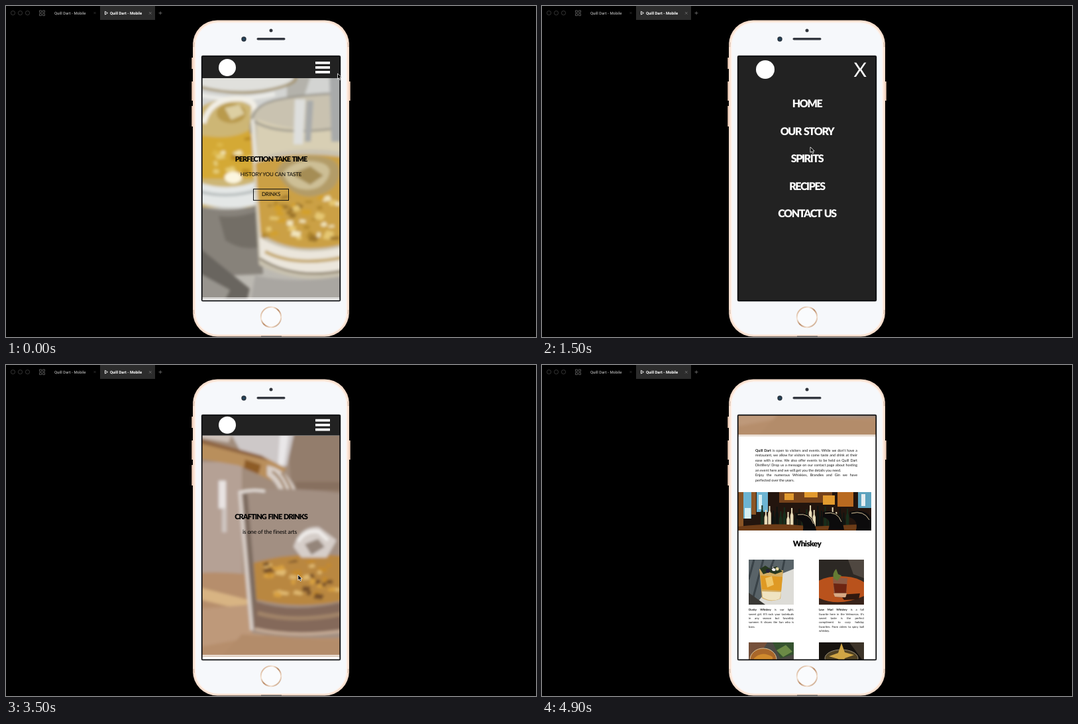
An HTML page for the animation above (5 s loop, 800x500 px).

```html
<!DOCTYPE html>
<html lang="en">
<head>
<meta charset="utf-8">
<title>Mobile prototype</title>
<style>
html, body { margin: 0; width: 100%; height: 100%; overflow: hidden; background: #000; }
body { text-rendering: geometricPrecision; font-family: Lato, "Open Sans", sans-serif; }
#stage { position: relative; width: 800px; height: 500px; overflow: hidden; background: #000; }
#stage > svg { position: absolute; left: 0; top: 0; }
#screen { position: absolute; left: 296px; top: 76px; width: 208px; height: 369px; overflow: hidden;
  background: #fff; box-shadow: 0 0 0 1.2px #0b0c0f; border-radius: 1px; }
#screen::after { content: ""; position: absolute; inset: 0; box-shadow: inset 0 0 0 .6px #0b0c0f; }
.page { position: absolute; left: 0; top: 0; width: 208px; height: 369px; background: #fff; }
.page svg { position: absolute; overflow: hidden; }
#menu { background: #222; color: #fff; }
#dim { position: absolute; inset: 0; background: #000; }
#story { height: 920px; }
.t { position: absolute; left: 0; width: 208px; line-height: 20px; text-align: center;
  white-space: nowrap; font-size: 8px; letter-spacing: -.02em; }
.b { font-weight: 900; letter-spacing: -.085em; word-spacing: .1em; }
.p { position: absolute; white-space: nowrap; text-align: justify; text-align-last: justify; color: #111; }
.p .end { text-align-last: left; }
.box { box-sizing: border-box; left: 77px; width: 54px; height: 18px; line-height: 15px; border: 1.5px solid #111; }
.tab { font: 500 5.9px Roboto, Inter, sans-serif; }
</style>
</head>
<body>
<div id="stage">
  <svg width="800" height="500">
    <defs>
      <linearGradient id="gold" x2="1" y2="1">
        <stop offset="0" stop-color="#c69a76"/><stop offset=".3" stop-color="#f6e6d8"/>
        <stop offset=".5" stop-color="#b98a66"/><stop offset=".75" stop-color="#f3dfce"/>
        <stop offset="1" stop-color="#a97c59"/>
      </linearGradient>
      <filter id="soft" x="-20%" y="-20%" width="140%" height="140%"><feGaussianBlur stdDeviation="2"/></filter>
      <filter id="fine"><feGaussianBlur stdDeviation=".5"/></filter>
    </defs>
    <g fill="none" stroke="#454545" stroke-width=".8">
      <circle cx="10.5" cy="10.5" r="3.1"/><circle cx="21.5" cy="10.5" r="3.1"/><circle cx="32.5" cy="10.5" r="3.1"/>
      <path stroke="#666" d="M50.5 6.8h3v3h-3zM55.5 6.8h3v3h-3zM50.5 11.6h3v3h-3zM55.5 11.6h3v3h-3z"/>
      <path stroke="#333" d="M132.500 9l3 3m0-3l-3 3"/>
    </g>
    <rect x="142" width="83" height="21" fill="#2c2c2c"/>
    <path d="M149.500 8.200v4.800l4-2.400z" fill="none" stroke="#fff" stroke-width=".9"/>
    <path d="M216 9l3.500 3.500m0-3.500l-3.500 3.500M230.500 10.700h5m-2.500-2.500v5" stroke="#777" stroke-width=".8"/>
    <text class="tab" x="73" y="12.700" fill="#aaa">Quill Dart - Mobile</text>
    <text class="tab" x="157" y="12.700" fill="#fff" style="font-weight:700">Quill Dart - Mobile</text>

    <path d="M281.500 78v17M281.500 114v29M281.500 151v31M518.500 114v29" stroke="#e9c9b4" stroke-width="2.500"/>
    <rect x="282" y="21.500" width="236" height="478" rx="37" fill="#f8dfcf"/>
    <path d="M282 55h4v7h-4zM514 55h4v7h-4zM282 459h4v6h-4zM514 459h4v6h-4z" fill="#dcc3b2"/>
    <rect x="284.500" y="24" width="231" height="473" rx="35" fill="#fff1e8"/>
    <rect x="286.500" y="25.500" width="227" height="470.500" rx="33.500" fill="#f6f8fb"/>
    <circle cx="400" cy="37" r="2.500" fill="#32363d"/>
    <rect x="378.500" y="48" width="43" height="3.600" rx="1.800" fill="#343840"/>
    <circle cx="359" cy="50" r="3.700" fill="#283440"/><circle cx="359" cy="50" r="1.700" fill="#244c66"/>
    <circle cx="400" cy="470" r="15.200" fill="#fafbfd" stroke="url(#gold)" stroke-width="2"/>
    <path d="M385 499.300h31" stroke="#555" stroke-width="1.600"/>
  </svg>

  <div id="screen">
    <div class="page" id="home">
      <svg width="208" height="334" style="top:33px">
        <rect width="208" height="334" fill="#bcb9b2"/>
        <g filter="url(#soft)">
          <path d="M-9-9H217V60H-9z" fill="#d3d4d2"/>
          <path d="M128-9h38L150 40 128 34z" fill="#b4b2ab"/>
          <ellipse cx="52" cy="-2" rx="86" ry="21" fill="#e0e0dc"/>
          <path d="M-9 12Q50 28 100 18T140-4" fill="none" stroke="#a69570" stroke-width="4"/>
          <path d="M-9 24Q45 38 110 24" fill="none" stroke="#ecece8" stroke-width="6"/>
          <path d="M-9 48Q35 18 74 42L84 195H-9z" fill="#cdb675"/>
          <path d="M2 68Q12 32 50 31T76 58" fill="none" stroke="#f2efe6" stroke-width="8"/>
          <ellipse cx="44" cy="53" rx="22" ry="15" fill="#b99a4c"/>
          <path d="M34 45l22-5 8 14-20 9z" fill="#ddcfa2"/>
          <path d="M-9 85Q50 97 78 73L84 152H-9z" fill="#d4a936"/>
          <g id="leftIce"></g>
          <ellipse cx="47" cy="150" rx="13" ry="9" fill="#fcf6df"/>
          <path d="M-9 156Q40 174 87 154V190Q40 203-9 187z" fill="#e4e7e6"/>
          <path d="M-9 170Q40 184 86 168" fill="none" stroke="#b5bbbb" stroke-width="4"/>
          <path d="M-9 192Q40 207 88 190L92 296-9 300z" fill="#87827a"/>
          <path d="M25 208Q55 212 86 200L88 255Q60 262 35 245z" fill="#736e66"/>
          <path d="M-9 252L72 318 66 344H-9z" fill="#69655f"/>
          <path d="M-9 292L42 320 30 344H-9z" fill="#98948e"/>
          <path d="M73 55Q95 20 217 26V300Q140 312 86 282z" fill="#c9c2b0"/>
          <path d="M84 62Q140 85 217 72V112Q140 100 82 122z" fill="#d8cfb4"/>
          <path d="M74 84Q70 50 96 38T217 22M74 62Q110 90 217 74" fill="none" stroke="#96938a" stroke-width="3"/>
          <path d="M76 62L90 250" stroke="#e9e6dd" stroke-width="5"/>
          <path d="M140 32h16L152 100H138z" fill="#dedfdd"/>
          <path d="M158 34h10L164 96h-9zM192 -9h25v105h-22z" fill="#a8aaaa"/>
          <path d="M80 128Q140 108 217 120V250Q140 270 88 235z" fill="#cba044"/>
          <path d="M112 142Q120 116 165 117T207 145 170 178 112 142" fill="#b39c68"/>
          <path d="M122 143Q140 122 170 126T190 150 155 168 122 143" fill="#cdbf96"/>
          <path d="M135 145l28-12 20 14-20 14z" fill="#a58d55"/>
          <g id="rightIce"></g>
          <path d="M86 240Q140 274 217 254V288Q140 304 88 272z" fill="#ebe6dc"/>
          <path d="M95 262Q140 286 217 270" fill="none" stroke="#c4a76b" stroke-width="5"/>
          <path d="M87 272Q140 306 217 290" fill="none" stroke="#847760" stroke-width="3"/>
          <path d="M80 298Q140 312 217 298V344H72z" fill="#a9a6a1"/>
        </g>
        <rect y="331" width="208" height="3" fill="#fff" opacity=".6"/>
      </svg>
      <div class="t b" style="top:146px;font-size:10.8px">PERFECTION TAKE TIME</div>
      <div class="t" style="top:167.500px">HISTORY YOU CAN TASTE</div>
      <div class="t box" style="top:200px">DRINKS</div>
    </div>

    <div class="page" id="menu">
      <svg width="208" height="60">
        <circle cx="41" cy="20" r="14" fill="#fff"/>
      </svg>
      <div class="t" style="left:164px;width:40px;top:10px;font-size:30px">X</div>
    </div>
    <div id="dim"></div>

    <div class="page" id="story">
      <svg width="208" height="334" style="top:33px">
        <rect width="208" height="334" fill="#ac9686"/>
        <g filter="url(#soft)">
          <path d="M-9-9H217V150H-9z" fill="#a18c7b"/>
          <path d="M128-9H217V210H145z" fill="#937d6c"/>
          <path d="M140 70H217V82H142z" fill="#87705f"/>
          <path d="M-9 40H60V225H-9z" fill="#b5a195"/>
          <path d="M25 68h11v42H25z" fill="#e8e3e2"/>
          <path d="M30 110h7v36h-7z" fill="#cfc5c1"/>
          <path d="M-9 208Q60 200 217 235V344H-9z" fill="#b68e6c"/>
          <path d="M-9 228L70 248 65 264-9 246z" fill="#d8b483"/>
          <path d="M-9 262L75 255 100 300-9 320z" fill="#be997a"/>
          <path d="M60 300L217 312V344H20z" fill="#b38c6b"/>
          <path d="M40-9H140L128 45Q100 62 70 45z" fill="#cdc8c8"/>
          <path d="M118-9h14l-8 52-10 6z" fill="#e9e7e8"/>
          <path d="M-9 3L90 30 128 50 105 68 55 45-9 34z" fill="#b98f5c"/>
          <path d="M-9 3L90 30 100 38-9 10z" fill="#8e6543"/>
          <path d="M-9-9H48L40 10-9 2z" fill="#cdc1b9"/>
          <path d="M65 36l24 8-4 14-22-9z" fill="#8d5b28"/>
          <path d="M98 45Q130 50 145 90L140 122 123 110Q120 75 98 60z" fill="#d9cfc7"/>
          <path d="M106 54Q128 70 131 110M120 56Q138 80 140 105" fill="none" stroke="#94724e" stroke-width="3"/>
          <path d="M57 86Q120 74 217 88V305Q140 308 75 298z" fill="#a28f82"/>
          <path d="M55 86Q75 80 95 84" fill="none" stroke="#e6e0dc" stroke-width="4"/>
          <path d="M57 86L75 294" stroke="#d9d0ca" stroke-width="5"/>
          <path d="M65 88L82 290" stroke="#7b6a5f" stroke-width="7"/>
          <path d="M78 192Q140 174 217 182V248Q150 264 82 248z" fill="#b9873f"/>
          <g id="storyIce"></g>
          <path d="M138 168Q148 136 176 138L203 158 188 184 150 184z" fill="#d6cec9"/>
          <path d="M145 160Q155 142 176 145L190 158" fill="none" stroke="#f1eeec" stroke-width="5"/>
          <path d="M155 164l20-8 10 12-20 12z" fill="#94857a"/>
          <path d="M80 250Q140 270 217 250V294Q140 304 78 290z" fill="#84695a"/>
          <path d="M84 268Q140 284 217 268" fill="none" stroke="#a28469" stroke-width="6"/>
          <path d="M80 292Q140 306 217 294" fill="none" stroke="#cbb09a" stroke-width="4"/>
        </g>
        <rect y="331" width="208" height="3" fill="#fff" opacity=".7"/>
      </svg>
      <div class="t b" style="top:146px;font-size:11px">CRAFTING FINE DRINKS</div>
      <div class="t" style="top:167.500px;left:-2px;font-size:8.600px">is one of the finest arts</div>
      <svg width="201" height="58" style="top:451px">
        <rect width="201" height="58" fill="#23150e"/>
        <g filter="url(#fine)">
          <path d="M0 0h8v58H0zM20 0h7v34h-7z" fill="#8a5526"/>
          <path d="M8 0h12v40H8zM28 0h17v30H28z" fill="#6cb4d2"/>
          <path d="M31 4h5v22h-5zM10 24h9v16h-9z" fill="#d6eef3"/>
          <path d="M62 0h80v16H62z" fill="#75421b"/>
          <path d="M70 2h14v10H70zM100 0h20v8h-20zM128 5h18v14h-18z" fill="#e29a2e"/>
          <path d="M150 0h24v22h-24z" fill="#b96a20"/>
          <path d="M181 0h20v24h-20z" fill="#5ca2be"/><path d="M186 3h6v18h-6z" fill="#e5edf0"/>
          <g id="bottles"></g>
          <path d="M0 52Q60 45 110 52L201 48V58H0z" fill="#6d3c17"/>
          <path d="M88 32Q112 27 118 58H98Q100 42 88 40zM128 30Q155 24 160 57H136Q142 40 128 38zM168 30Q194 24 201 40V58H178Q182 42 168 38z" fill="#0c0b0c"/>
          <path d="M90 34Q108 31 114 48M131 32Q150 28 156 45M171 32Q190 27 198 42" fill="none" stroke="#d9c49a"/>
        </g>
      </svg>
      <div class="t b" style="top:519px;font-size:11.800px;letter-spacing:-.05em">Whiskey</div>

      <svg width="68" height="68" style="left:16px;top:553px">
        <rect width="68" height="68" fill="#596368"/>
        <g filter="url(#fine)">
          <path d="M8 0l-8 30M22 0L6 60M38 0L26 30M54 0L48 30" stroke="#394247" stroke-width="3"/>
          <path d="M48 22L68 14V68H10L30 44z" fill="#dddcd7"/>
          <path d="M0 50L25 68H0z" fill="#3a3936"/>
          <path d="M16 14L52 16 48 59Q34 66 20 58z" fill="#d4ad62"/>
          <path d="M18 24L51 26 49 47 20 45z" fill="#df9a24"/>
          <path d="M25 28l10-3 3 13-10 4z" fill="#f0c769"/>
          <path d="M20 48L49 49 47 59Q34 65 21 57z" fill="#efe3c1"/>
          <path d="M17 14l8-5 8 5 9-4 9 8-11 4-9-3-9 3z" fill="#27381f"/>
          <circle cx="29" cy="17" r="3" fill="#242038"/><circle cx="43" cy="14" r="2.500" fill="#e6d9a2"/>
        </g>
      </svg>
      <svg width="68" height="68" style="left:122px;top:553px">
        <rect width="68" height="68" fill="#2c2824"/>
        <g filter="url(#fine)">
          <path d="M44 0H68V28L52 22z" fill="#4f4740"/>
          <ellipse cx="32" cy="46" rx="44" ry="21" fill="#b9521c"/>
          <path d="M0 58Q30 72 68 55V68H0z" fill="#38231a"/>
          <path d="M32 53L62 51 60 60 38 61z" fill="#32190f"/>
          <path d="M21 27L43 28 41 56Q31 59 23 55z" fill="#8c5a44"/>
          <path d="M22 36L42 37 41 50 24 50z" fill="#6d2411"/>
          <path d="M22 51L42 51 40 57 24 56z" fill="#d8a983"/>
          <path d="M22 28q-2-8 4-14l3 8 5 2-6 8z" fill="#657b34"/>
        </g>
      </svg>
      <svg width="68" height="68" style="left:16px;top:678px">
        <rect width="68" height="68" fill="#4b4944"/>
        <g filter="url(#fine)">
          <path d="M0 0H28L10 30H0z" fill="#75503a"/>
          <path d="M36 0H68V18L48 24z" fill="#35522f"/>
          <path d="M42 12l14-8 10 10-14 8z" fill="#6b8a46"/>
          <ellipse cx="22" cy="26" rx="20" ry="17" fill="#a9672a" stroke="#d8c49c"/>
          <path d="M8 24Q20 12 36 22V40H8z" fill="#d08a2c"/>
        </g>
      </svg>
      <svg width="68" height="68" style="left:122px;top:678px">
        <rect width="68" height="68" fill="#17130f"/>
        <g filter="url(#fine)">
          <path d="M46 0H68V30z" fill="#3c3328"/>
          <ellipse cx="34" cy="24" rx="25" ry="13" fill="#514223" stroke="#9a8e79"/>
          <path d="M34 1l5 14 14 4-14 5-5 14-5-13-14-4 14-5z" fill="#cfa545"/>
        </g>
      </svg>
    </div>
  </div>

  <svg width="800" height="500">
    <g id="arrow" stroke="#fff" stroke-width=".8">
      <path d="M0 0V8.300L2 6.600 3.400 9.700 5 9 3.600 6H6.200z" fill="#000"/>
    </g>
    <g id="hand" stroke="#000" stroke-width=".6">
      <path d="M1.700 5V.9q.8-1 1.500 0V3.600L6 4.200q1 .3.900 1.300L6.300 8.600H2.400L.1 5.800q.2-1.200 1.600-.8z" fill="#fff"/>
    </g>
  </svg>
</div>
<script>
const $ = id => document.getElementById(id);
const add = (id, html) => $(id).insertAdjacentHTML('beforeend', html);

const header = `<svg width="208" height="33"><rect width="208" height="33" fill="#222"/>
  <circle cx="38" cy="17" r="13" fill="#fff"/>
  <path d="M171 9.900h22m-22 7h22m-22 7h22" stroke="#fff" stroke-width="3.700"/></svg>`;
add('home', header);
add('story', header);

['HOME', 'OUR STORY', 'SPIRITS', 'RECIPES', 'CONTACT US'].forEach((name, i) =>
  add('menu', `<div class="t b" style="top:${62 + 41.5 * i}px;font-size:16px">${name}</div>`));

function paragraph(x, y, width, size, leading, lines) {
  const rows = lines.map(s => `<div class="${s.endsWith('.') ? 'end' : ''}">${s}</div>`).join('');
  add('story', `<div class="p" style="left:${x}px;top:${y}px;width:${width}px;` +
    `font-size:${size}px;line-height:${leading}px">${rows}</div>`);
}
paragraph(26, 385.7, 154, 5.4, 7.5, [
  "<b>Quill Dart</b> is open to visiters and events. While we don't have a",
  'restaurant, we allow for visitors to come taste and drink at their',
  'ease with a view. We also offer events to be held on Quill Dart',
  'Distillery! Drop us a message on our contact page about hosting',
  'an event here and we will get you the details you need.',
  'Enjoy the numerous Whiskies, Brandies and Gin we have',
  'perfected over the years.']);
paragraph(16, 626.4, 68, 4.3, 6.3, [
  '<b>Dusky Whiskey</b> is our light,',
  "sweet girl. It'll rock your tastebuds",
  'in any season but favoribly',
  'summer. It shows the Sun who is',
  'boss.']);
paragraph(122, 626.4, 68, 4.3, 6.3, [
  '<b>Low Marl Whiskey</b> is a fall',
  "favorite here in the Velmorras. It's",
  'sweet taste is the perfect',
  'compliment to cozy holiday',
  'favorites. From ciders to spicy ball',
  'whiskey.']);

let seed = 7;
const random = () => (seed = seed * 16807 % 2147483647) / 2147483647;

// facets of ice and liquor scattered in a box
function facets(id, count, x, y, w, h, colors) {
  for (let i = 0; i < count; i++) {
    const a = 5 + random() * 9, b = 3 + random() * 5, lean = random() * 10 - 5;
    add(id, `<path d="M${x + random() * (w - a)} ${y + random() * (h - b)}l${a} ${lean} ${-lean} ${b} ${-a} ${-lean / 2}z"
      fill="${colors[i % colors.length]}"/>`);
  }
}
facets('leftIce', 14, 2, 88, 76, 60, ['#e6cd78', '#b98a24', '#ddb748', '#f3e6b4']);
facets('rightIce', 44, 88, 176, 124, 70, ['#e6c873', '#9c7429', '#f2e6bd', '#d3a02c', '#b3892f']);
facets('storyIce', 40, 82, 190, 130, 56, ['#d8a040', '#765029', '#e2bb72', '#c58a2c']);

const glass = ['#172d1b', '#d9ad45', '#0f1411', '#a33d1c', '#e8dcb8', '#31502a'];
for (let i = 0; i < 24; i++) {
  const x = 34 + i * 5.6, y = 20 + i * 7 % 13;
  add('bottles', `<path d="M${x} 54V${y + 11}l1.300-4V${y}h2v7l1.300 4V54z" fill="${glass[i * 5 % 6 ^ i & 1]}"/>`);
}

const clamp = x => Math.min(1, Math.max(0, x));
const smooth = x => x * x * (3 - 2 * x);

// cubic-bezier(0, 0, .58, 1)
function easeOut(x) {
  let lo = 0, hi = 1;
  for (let i = 0; i < 24; i++) {
    const u = (lo + hi) / 2;
    if (1.74 * u * u * (1 - u) + u ** 3 < x) lo = u; else hi = u;
  }
  return smooth(lo);
}

// time, x, y of the pointer
const path = [
  [0, 500.5, 102], [400, 474, 93], [700, 468.5, 92.5], [900, 468.5, 92.5], [1250, 423, 178],
  [1500, 405, 213], [1750, 409, 186], [2400, 409, 186], [2700, 424.5, 262.5],
  [3100, 440, 316], [3500, 440.8, 317], [3900, 439.5, 312], [4300, 438, 312], [4700, 346, 303], [5000, 346, 303]];

function pointer(t) {
  const i = path.findIndex(p => p[0] > t), a = path[i - 1], b = path[i];
  const k = smooth((t - a[0]) / (b[0] - a[0]));
  const over = t > 350 && t < 950 || t > 1680 && t < 2480 || t > 4600;
  $('arrow').style.display = over ? 'none' : '';
  $('hand').style.display = over ? '' : 'none';
  const place = `translate(${a[1] + (b[1] - a[1]) * k} ${a[2] + (b[2] - a[2]) * k})`;
  $('arrow').setAttribute('transform', place);
  $('hand').setAttribute('transform', place);
}

function draw(now) {
  const t = now % 5000;
  const open = easeOut(clamp((t - 550) / 300));
  const rise = easeOut(clamp((t - 2498) / 300));
  const scroll = 335 * smooth(clamp((t - 3450) / 1060));
  $('menu').style.transform = `translate(${208 * (1 - open)}px, ${-92 * rise}px)`;
  $('dim').style.opacity = rise * .48;
  $('story').style.transform = `translateY(${369 * (1 - rise) - scroll}px)`;
  pointer(t);
  requestAnimationFrame(draw);
}
draw(0);
</script>
</body>
</html>
```
